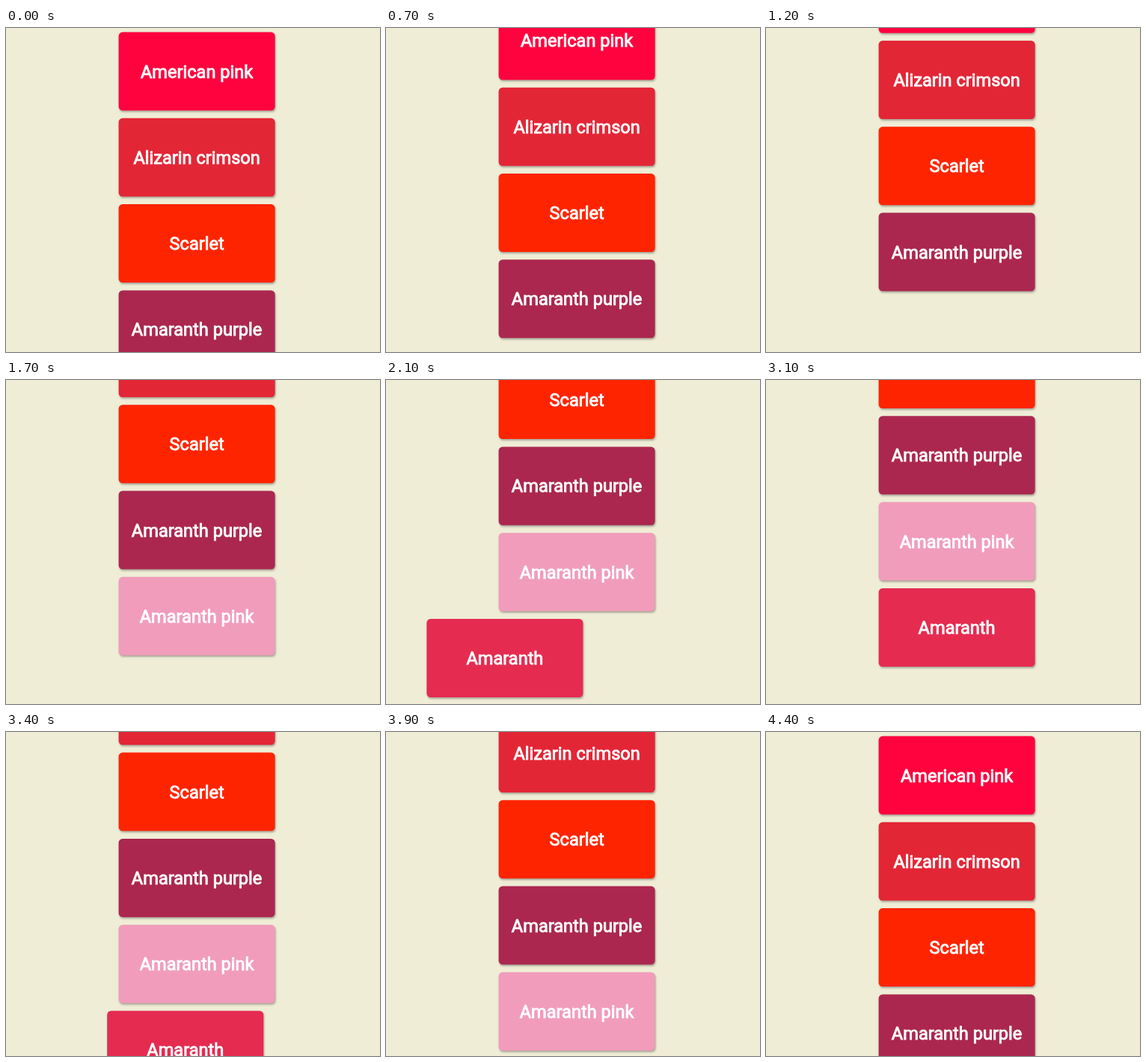
An HTML page that plays this animation: 500 px wide and 434 px high, repeating every 4900 ms.

```html
<!DOCTYPE html>
<html lang="en">
<head>
<meta charset="utf-8">
<title>Scroll animation</title>
<style>
  html, body {
    margin: 0;
    width: 100%;
    height: 100%;
    overflow: hidden;
    background: #efedd6;
  }
  .stage {
    position: relative;
    width: 500px;
    height: 434px;
    overflow: hidden;
  }
  .card {
    position: absolute;
    left: 0;
    top: 0;
    width: 209px;
    height: 105px;
    display: flex;
    align-items: center;
    justify-content: center;
    border-radius: 5.2px;
    box-shadow: 1px 2px 2.6px rgba(0, 0, 0, .3);
    color: #fff;
    font: 400 23.58px Roboto, sans-serif;
    -webkit-text-stroke: .9px #fff;
    white-space: nowrap;
  }
</style>
</head>
<body>
<div class="stage">
  <div class="card" style="background:#ff033e">American pink</div>
  <div class="card" style="background:#e32636">Alizarin crimson</div>
  <div class="card" style="background:#ff2400">Scarlet</div>
  <div class="card" style="background:#ab274f">Amaranth purple</div>
  <div class="card" style="background:#f19cbb">Amaranth pink</div>
  <div class="card" style="background:#e52b50">Amaranth</div>
</div>
<script>
  const LOOP = 4900, STEP = 100;
  const LEFT = 150.6, TOP = 5.5, PITCH = 115.3;
  const NOTCH = 52.4, NOTCH_TIME = 200;
  const SLIDE_TIME = 400, SLIDE_DISTANCE = 838.4;

  // Start times of the wheel notches, down and then back up.
  const notchesDown = [560, 1016, 1240, 1545, 1790, 2250];
  const notchesUp = [3040, 3210, 3380, 3837, 4017, 4190];

  // Cards that slide in from a side and leave the same way.
  const slides = {
    4: { side: 1, enter: 1275, leave: 4000 },
    5: { side: -1, enter: 1860, leave: 3387 }
  };

  const cards = [...document.querySelectorAll('.card')];
  const clamp = x => Math.min(1, Math.max(0, x));
  const smooth = x => x * x * (3 - 2 * x);
  const bezier = (a, b, u) => 3 * a * u * (1 - u) ** 2 + 3 * b * u * u * (1 - u) + u ** 3;

  // The CSS "ease" curve.
  function ease(x) {
    let low = 0, high = 1;
    for (let i = 0; i < 24; i++) {
      const mid = (low + high) / 2;
      if (bezier(.25, .25, mid) < x) low = mid; else high = mid;
    }
    return bezier(.1, 1, high);
  }

  const turned = (starts, t) =>
    starts.reduce((sum, start) => sum + smooth(clamp((t - start) / NOTCH_TIME)), 0);

  const scrollAt = t => NOTCH * (turned(notchesDown, t) - turned(notchesUp, t));

  function shiftAt(slide, t) {
    if (!slide) return 0;
    const progress = start => ease(clamp((t - start) / SLIDE_TIME));
    const away = t < slide.leave ? 1 - progress(slide.enter) : progress(slide.leave);
    return away < .001 ? 0 : slide.side * SLIDE_DISTANCE * away;
  }

  function render(t) {
    const scroll = scrollAt(t);
    cards.forEach((card, i) => {
      const x = LEFT + shiftAt(slides[i], t), y = TOP + i * PITCH - scroll;
      card.style.transform = `translate(${x.toFixed(2)}px, ${y.toFixed(2)}px)`;
    });
  }

  const begin = performance.now();
  function tick() {
    const t = (performance.now() - begin) % LOOP;
    render(Math.floor(t / STEP) * STEP);
    requestAnimationFrame(tick);
  }
  tick();
</script>
</body>
</html>
```
